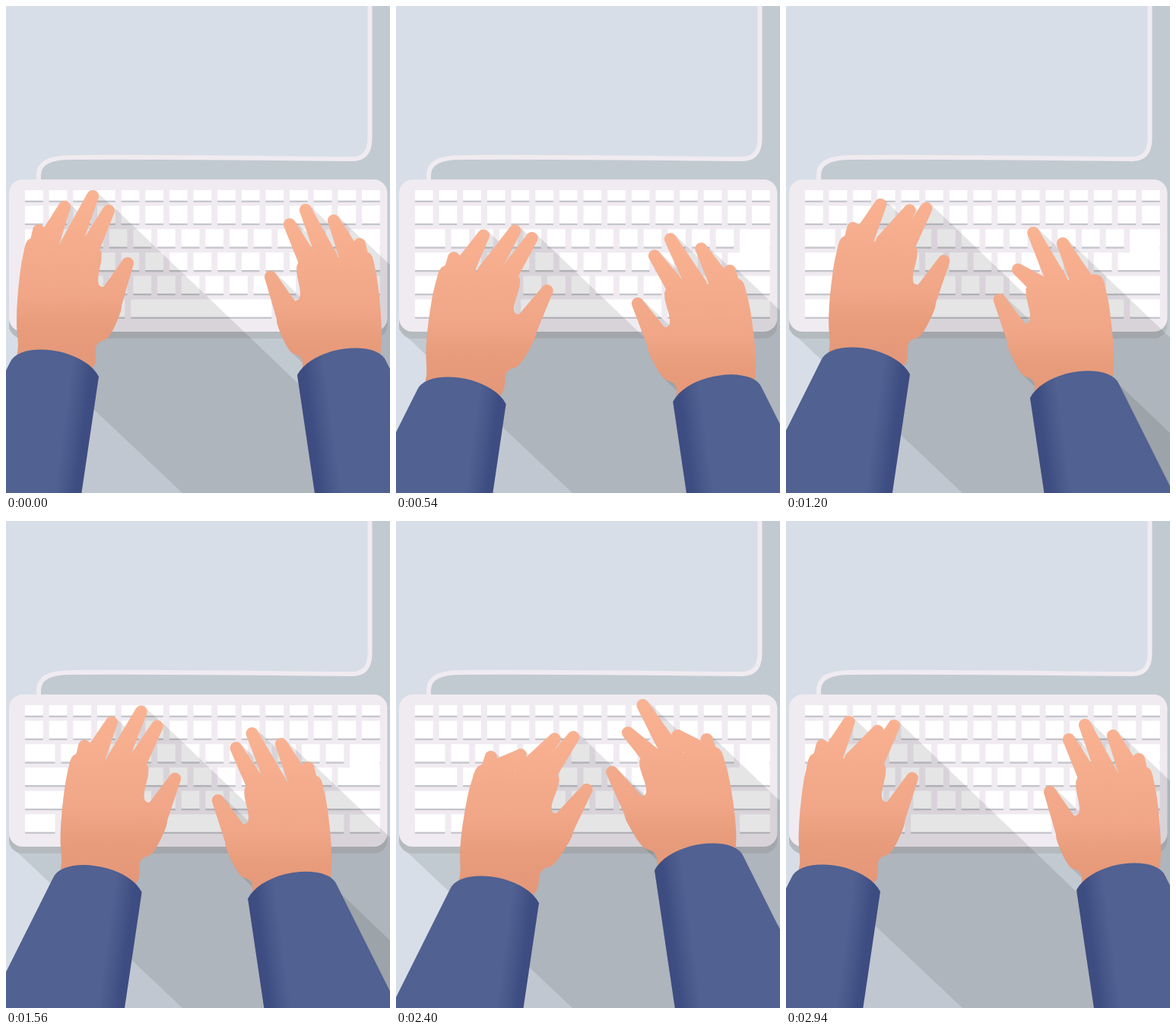
Write an HTML page with a canvas that moves like this. It is 505 by 640 pixels and loops after 3 s.

```html
<!DOCTYPE html>
<html>
<head>
<meta charset="utf-8">
<title>Typing hands</title>
<style>
html, body { margin: 0; width: 100%; height: 100%; overflow: hidden; background: #d7dee7; }
canvas { display: block; }
</style>
</head>
<body>
<canvas id="stage" width="505" height="640"></canvas>
<script>
const ctx = document.getElementById('stage').getContext('2d');
const LOOP = 3000, STEP = 60, TAP = 300;
const PINKY = 0, RING = 1, MIDDLE = 2, INDEX = 3;

// path: time, cuff corner x, y and lean of the hand; taps: time, finger, depth
const LEFT = {
  side: 1, dx: 0, dy: 0,
  path: [[0, 122, 487, 0], [300, 135, 507, 13], [780, 153, 532, 11], [1200, 163, 484, 5],
    [1920, 189, 494, 4], [2400, 188, 502, 19], [2940, 124, 487, 3]],
  taps: [[300, RING, 0.35], [300, MIDDLE, 0.85], [780, MIDDLE, 0.65], [1200, MIDDLE, 0.33],
    [1920, MIDDLE, 0.33], [2400, MIDDLE, 0.33], [2400, RING, 0.6], [2940, MIDDLE, 0.4]]
};
const RIGHT = {
  side: -1, dx: 3, dy: 20,
  path: [[0, 383, 485, 0], [300, 374, 499, 9], [780, 352, 534, 8], [1200, 321, 515, 4],
    [1920, 317, 478, 3], [2400, 340, 459, 16], [2940, 382, 485, 0]],
  taps: [[300, RING, 0.45], [300, INDEX, 1], [780, MIDDLE, 0.55], [780, INDEX, 0.37],
    [1200, PINKY, 1], [1200, INDEX, 0.6], [1920, MIDDLE, 0.4], [2400, RING, 0.55],
    [2400, INDEX, 0.35]]
};

// One hand serves both sides, relative to the cuff corner
const PALM = [[-60, 20], [-105, -5], [-106, -42], [-108, -72], [-106, -112], [-100, -157],
  [-89, -182], [-48, -174], [1, -169], [-1, -128], [4, -118], [20, -118], [30, -95],
  [24, -73], [12, -51], [-3, -41], [-9, -10]];
const FINGERS = [
  { root: [-84, -152], r: 12, tip: [-79, -192] },
  { root: [-67, -176], r: 15, tip: [-45, -223] },
  { root: [-37, -172], r: 14, tip: [-8, -237] },
  { root: [-12, -169], r: 13, tip: [13, -218] },
  { root: [12, -95], r: 18, tip: [38, -149] }
];

// Monotone cubic through the looping path
function follow(path, t) {
  const n = path.length;
  const at = (k, c) => path[(k + n) % n][c] + (c ? 0 : Math.floor(k / n) * LOOP);
  const span = k => at(k + 1, 0) - at(k, 0);
  const i = path.filter(p => p[0] <= t).length - 1;
  const h = span(i), u = (t - at(i, 0)) / h, v = 1 - u;
  return [1, 2, 3].map(c => {
    const slope = k => (at(k + 1, c) - at(k, c)) / span(k);
    const tangent = k => {
      const p = slope(k - 1), q = slope(k);
      return p * q > 0 ? 2 * p * q / (p + q) : 0;
    };
    return at(i, c) * v * v * (1 + 2 * u) + at(i + 1, c) * u * u * (1 + 2 * v) +
      h * u * v * (v * tangent(i) - u * tangent(i + 1));
  });
}

function curl(taps, finger, t) {
  return taps.filter(tap => tap[1] === finger && Math.abs(t - tap[0]) < TAP)
    .reduce((sum, [at, , depth]) => sum + depth * (1 + Math.cos(Math.PI * (t - at) / TAP)) / 2, 0);
}

// Closed Catmull-Rom curve as a polygon
function smooth(pts) {
  const n = pts.length, out = [];
  pts.forEach((p, i) => {
    const o = pts[(i + n - 1) % n], q = pts[(i + 1) % n], r = pts[(i + 2) % n];
    for (let u = 0; u < 1; u += 0.2) {
      out.push([0, 1].map(k => p[k] + u / 2 * (q[k] - o[k] +
        u * (2 * o[k] - 5 * p[k] + 4 * q[k] - r[k] + u * (3 * (p[k] - q[k]) + r[k] - o[k])))));
    }
  });
  return out;
}

function capsule([x, y], r, [tx, ty]) {
  const a = Math.atan2(ty - y, tx - x), out = [];
  const arc = (cx, cy, rad, from) => {
    for (let k = 0; k <= 12; k++) {
      const b = from + Math.PI * k / 12;
      out.push([cx + rad * Math.cos(b), cy + rad * Math.sin(b)]);
    }
  };
  arc(tx, ty, 8, a - Math.PI / 2);
  arc(x, y, r, a + Math.PI / 2);
  return out;
}

// Cuff as a cubic Bezier, then two straight edges running off the stage
function sleeveShape() {
  const out = [];
  for (let u = 0; u <= 1.001; u += 0.05) {
    const v = 1 - u, a = 3 * u * v * v, b = 3 * u * u * v, c = u ** 3;
    out.push([-20 * a - 105 * b - 117 * c, -38 * a - 48 * b - 18 * c]);
  }
  return [...out, [-247, 242], [-37, 250]];
}

function buildArm({ side, dx, dy, path, taps }, t) {
  const [cx, cy, lean] = follow(path, t);
  const place = ([x, y]) => {
    const shift = lean * Math.max(0, -y) / 120 * (0.4 + 0.6 * (x + 106) / 134);
    return [cx + dx + side * (x + shift), cy + dy + y];
  };
  const skin = FINGERS.map(({ root, r, tip }, i) => {
    const y = tip[1] + (root[1] - tip[1]) * curl(taps, i, t);
    return capsule(place(root), r, place([tip[0], y]));
  });
  skin.push(smooth(PALM.map(place)));
  const sleeve = sleeveShape().map(([x, y]) => [cx + side * x, cy + y]);
  return { cx, cy, dy, side, skin, sleeve };
}

function fillPolygon(pts, style) {
  ctx.fillStyle = style;
  ctx.beginPath();
  pts.forEach(p => ctx.lineTo(...p));
  ctx.fill();
}

function gradient(x0, y0, x1, y1, stops) {
  const g = ctx.createLinearGradient(x0, y0, x1, y1);
  stops.forEach(([at, color]) => g.addColorStop(at, color));
  return g;
}

// Long shadow: every edge swept to the lower right, all with one winding
function castShadow(arm) {
  const sx = 900, sy = 860;
  ctx.beginPath();
  for (const poly of [...arm.skin, arm.sleeve]) {
    poly.forEach((p, i) => {
      let a = p, b = poly[(i + 1) % poly.length];
      if ((b[0] - a[0]) * sy < (b[1] - a[1]) * sx) [a, b] = [b, a];
      ctx.moveTo(a[0], a[1]);
      ctx.lineTo(b[0], b[1]);
      ctx.lineTo(b[0] + sx, b[1] + sy);
      ctx.lineTo(a[0] + sx, a[1] + sy);
      ctx.closePath();
    });
  }
  ctx.fillStyle = 'rgba(0,0,0,.1)';
  ctx.fill();
}

function drawArm({ cx, cy, dy, side, skin, sleeve }) {
  const tone = gradient(0, cy + dy - 245, 0, cy + dy - 15,
    [[0, '#fab392'], [0.6, '#f0a687'], [0.78, '#e89c7b'], [1, '#e4987a']]);
  skin.forEach(poly => fillPolygon(poly, tone));
  fillPolygon(sleeve, gradient(cx - 37 * side, cy - 5, cx, cy,
    [[0, '#506192'], [0.4, '#475789'], [0.75, '#3d4c81'], [1, '#3d4c81']]));
}

function roundRect(x, y, w, h, r, color) {
  ctx.fillStyle = color;
  ctx.beginPath();
  ctx.roundRect(x, y, w, h, r);
  ctx.fill();
}

// A row of keys, given by their widths in key units
function keyRow(y, h, widths) {
  const unit = 31.65, gap = 8;
  let x = 25;
  for (const w of widths) {
    ctx.fillStyle = '#c5c6cb';
    ctx.fillRect(x, y + h, w * unit - gap, 2.5);
    ctx.fillStyle = '#fff';
    ctx.fillRect(x, y, w * unit - gap, h);
    x += w * unit;
  }
}

function drawDesk() {
  ctx.fillStyle = '#d7dee7';
  ctx.fillRect(0, 0, 505, 640);
  const cable = 'M478.5 0V175Q478 201 455 201C330 200 200 198 85 199C57 199 43 207 43 222V230';
  ctx.fillStyle = '#c2cad1';
  ctx.fill(new Path2D(cable + 'L10 300L4 425L232 640H505V0Z'));
  ctx.strokeStyle = '#f0ebf1';
  ctx.lineWidth = 6;
  ctx.stroke(new Path2D(cable));

  roundRect(4, 237, 497.5, 200, 18, '#b5babe');
  roundRect(4, 228, 497.5, 200, 18, '#f0ebf1');
  const ones = n => Array(n).fill(1);
  keyRow(242, 13.5, ones(15));
  [
    ones(15),
    [1.5, ...ones(12), 1.5],
    [2, ...ones(11), 2],
    [2.5, ...ones(10), 2.5],
    [1.5, 1.5, 1.4, 6.1, 1.5, 1.5, 1.5]
  ].forEach((widths, i) => keyRow(262.5 + 30.75 * i, 23, widths));
  ctx.fillRect(452, 300, 39.5, 30); // joins the tall enter key
}

function frame(now) {
  const t = Math.floor(now % LOOP / STEP) * STEP;
  const arms = [LEFT, RIGHT].map(arm => buildArm(arm, t));
  drawDesk();
  arms.forEach(castShadow);
  arms.forEach(drawArm);
  requestAnimationFrame(frame);
}
frame(performance.now());
</script>
</body>
</html>
```
